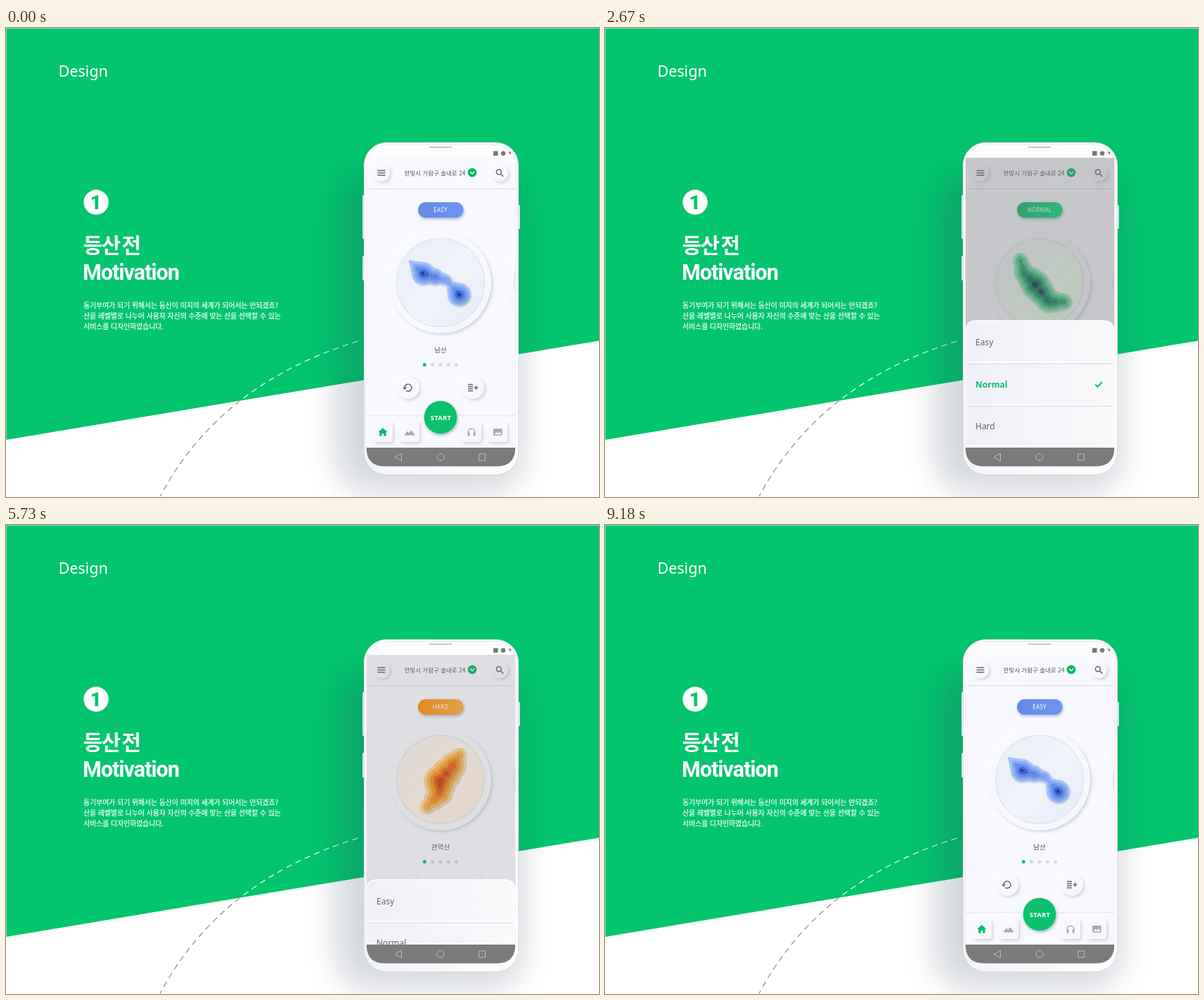
An HTML page for the animation above (9240 ms loop, 842 by 665 pixels).

```html
<!DOCTYPE html>
<html lang="ko">
<head>
<meta charset="utf-8">
<title>Design</title>
<style>
html, body { margin: 0; width: 100%; height: 100%; overflow: hidden; background: #fff; }
svg { display: block; width: 100%; height: 100%; }
text { font-family: "Noto Sans CJK KR", "Noto Sans CJK JP", sans-serif; }
.latin { font-family: "Noto Sans", sans-serif; }
.tight { font-family: Roboto, sans-serif; }
.mid { text-anchor: middle; }
.raised { fill: #f7f8fc; filter: drop-shadow(2px 2px 2px #cdd0dc) drop-shadow(-1px -1px 1px #fff); }
.line { fill: none; stroke: #666; stroke-width: 1.5; }
.layer { filter: drop-shadow(1px 1.5px 1.2px rgba(20, 30, 60, .25)); }
.pill { filter: drop-shadow(1px 2px 2px rgba(40, 60, 120, .35)); }
.row { font-size: 12px; fill: #666; }
.row.on { fill: #06c16b; font-weight: 600; }
.arc { fill: none; stroke-width: 1.2; stroke-dasharray: 8.5 6; }
</style>
</head>
<body>
<svg viewBox="0 0 842 665">
  <defs>
    <clipPath id="greenClip"><path d="M0 0H842V443.500L0 584Z"/></clipPath>
    <clipPath id="screenClip"><rect x="512" y="184" width="211" height="411"/></clipPath>
    <filter id="soft" x="-50%" y="-30%" width="200%" height="160%"><feGaussianBlur stdDeviation="25"/></filter>
    <linearGradient id="body" x2="1" y2="1">
      <stop stop-color="#fff"/><stop offset=".5" stop-color="#f3f4f8"/><stop offset="1" stop-color="#fff"/>
    </linearGradient>
    <linearGradient id="rowFill"><stop stop-color="#eff0f8"/><stop offset="1" stop-color="#f9f9fa"/></linearGradient>
  </defs>
  <defs id="fills"></defs>

  <path class="arc" d="M500 444Q304 504 219 664" stroke="#8a8a8a"/>
  <path d="M0 0H842V443.500L0 584Z" fill="#03c56e"/>
  <path d="M.5 584V.5H842" fill="none" stroke="#fff" opacity=".5"/>
  <path class="arc" d="M500 444Q304 504 219 664" stroke="#e6fff3" clip-path="url(#greenClip)"/>

  <g fill="#fff">
    <text class="latin" x="74.500" y="68.500" font-size="21.500" font-weight="500">Design</text>
    <circle cx="128" cy="247" r="17.700"/>
    <text class="mid tight" x="127.500" y="257" font-size="28" font-weight="900" fill="#03c56e">1</text>
    <text x="109.500" y="319" font-size="30" font-weight="900" letter-spacing="-1.6" word-spacing="-4">등산 전</text>
    <text class="tight" x="109" y="356.500" font-size="30.500" font-weight="700" letter-spacing="-1">Motivation</text>
    <g font-size="9.820" stroke="#fff" stroke-width=".2">
      <text x="110" y="396.500">동기부여가 되기 위해서는 등산이 미지의 세계가 되어서는 안되겠죠?</text>
      <text x="110" y="411.500">산을 레벨별로 나누어 사용자 자신의 수준에 맞는 산을 선택할 수 있는</text>
      <text x="110" y="426.500">서비스를 디자인하였습니다.</text>
    </g>
  </g>

  <!-- phone -->
  <rect x="470" y="205" width="262" height="450" rx="40" fill="#24364e" opacity=".2" filter="url(#soft)"/>
  <g fill="#f2f4f6" stroke="#d5dde0" stroke-width=".5">
    <rect x="506.500" y="237" width="4" height="62" rx="1.500"/>
    <rect x="506.500" y="323" width="4" height="35" rx="1.500"/>
    <rect x="725.500" y="251" width="4" height="34" rx="1.500"/>
  </g>
  <rect x="508.500" y="162.500" width="219" height="471" rx="32" fill="url(#body)" stroke="#d9dce4"/>
  <rect x="512" y="165.500" width="211" height="456" rx="28" fill="#fcfcfe" stroke="#e4e6ec" stroke-width=".6"/>
  <path d="M601 169H633" stroke="#aaa" stroke-width="1.300"/>
  <g fill="#777"><path d="M692 174.500h6.500v6.500h-6.500zM713 175l4 5v-4z"/><circle cx="706" cy="177.800" r="3.200"/></g>

  <g clip-path="url(#screenClip)">
    <rect x="512" y="184" width="211" height="411" fill="#f8f9fe"/>
    <path d="M512 228H723" stroke="#e6e8f0" stroke-width="2"/>
    <circle class="raised" cx="533" cy="205.500" r="12"/>
    <path class="line" d="M527.500 202.200h11M527.500 205.500h11M527.500 208.800h11"/>
    <circle class="raised" cx="701" cy="205.500" r="12"/>
    <path class="line" d="M702.600 207l3.600 3.600M703.300 204.300a3.500 3.500 0 1 1-7 0a3.500 3.500 0 1 1 7 0"/>
    <text class="mid" x="609" y="208.500" font-size="8.500" fill="#555">한빛시 가람구 솔내로 24</text>
    <circle cx="662" cy="205" r="6.300" fill="#05b966"/>
    <path d="M659 203.800l3 3l3-3" fill="none" stroke="#fff" stroke-width="1.400"/>

    <rect id="pill" class="pill" x="585" y="247" width="64.500" height="22" rx="11"/>
    <text id="pillText" class="mid latin" x="617" y="261" font-size="8" font-weight="500" letter-spacing=".2" fill="#fff"></text>
    <g id="cards"></g>
    <g id="dots"></g>

    <path d="M512 549.500H723" stroke="#e9ebf2" stroke-width="2"/>
    <circle class="raised" cx="571" cy="510" r="16"/>
    <path class="line" d="M566 510a5 5 0 1 1 2 4"/><path d="M562.800 509.500h6.400l-3.200 3.600z" fill="#666"/>
    <circle class="raised" cx="663" cy="510" r="16"/>
    <path class="line" d="M656 505.500h7M656 508.500h7M656 511.500h7M656 514.500h7M664.500 510h6M667.500 507v6"/>
    <g id="tabs"></g>
    <path d="M535 567l-6.500 6h1.800v5.500h3.400v-3.600h2.600v3.600h3.400v-5.500h1.800z" fill="#05bd68"/>
    <path d="M565.500 577.500l4.500-6l2.300 3l3-4.500l5.700 7.500z" fill="#a9abb2"/>
    <path d="M656.200 574.500v-1.500a4.800 4.800 0 0 1 9.600 0v1.500" fill="none" stroke="#a9abb2" stroke-width="1.500"/>
    <path d="M655.500 573.500h3v5h-3zM663.500 573.500h3v5h-3z" fill="#a9abb2"/>
    <rect x="692" y="568" width="12.500" height="10" rx="1.300" fill="#a9abb2"/>
    <path d="M693.500 576.500l3-3.800l2 2.200l2.300-3l2.800 4.600z" fill="#f7f8fc"/>
    <circle cx="617" cy="552" r="23.300" fill="#0cc16d" style="filter:drop-shadow(1px 2px 2px #9fb9b0)"/>
    <text class="mid latin" x="617.500" y="555.500" font-size="9.500" font-weight="700" letter-spacing=".2" fill="#fff">START</text>

    <rect id="dim" x="512" y="184" width="211" height="411" fill="#747474"/>
    <g id="sheet">
      <path d="M512 596V431q0-16 16-16H707q16 0 16 16V596z" fill="url(#rowFill)" stroke="#fff" stroke-width="1.500"/>
      <path d="M512 474H722M512 534H722M512 592H722" stroke="#fff" stroke-width="2"/>
      <path d="M513 476H721M513 536H721" stroke="#e0e1ee" stroke-width="1.600"/>
      <text class="row latin" x="526" y="450">Easy</text>
      <text class="row latin" x="526" y="509.500">Normal</text>
      <text class="row latin" x="526" y="568.500">Hard</text>
      <path id="tick" d="M696 505.500l3.300 3.300l6.500-6.800" fill="none" stroke="#06c16b" stroke-width="2"/>
    </g>
  </g>

  <path d="M512 595H723V599Q721 621 698 621.500H537Q514 621 512 599Z" fill="#7b7b7b"/>
  <g fill="none" stroke="#bdbdbd"><path d="M552 608.500l9.500-5.300v10.600zM671.500 604h9v9h-9z"/><circle cx="617" cy="608.500" r="5"/></g>
</svg>
<script>
const $ = id => document.getElementById(id);
const LOOP = 9240, STEP = 30, GAP = 167, GREEN = [5, 193, 107], GRAY = [214, 215, 222];

// A map is a mountain ridge: key points "x,y,radius" around the dish centre.
const levels = [
  { name: 'EASY', pill: ['#648be4', '#6c95ef'], dish: ['#e8edf7', '#eff4fb', '#e8ecfa'],
    shades: ['#a6c3fb', '#83a9f6', '#6690ee', '#3b67d2', '#12357f'],
    maps: { 남산: '-44,-31,1 -25,-13,15 8,-4,7 14,3,5 28,19,17',
            인왕산: '10,-53,5 2,-24,13 3,-5,14 -11,11,17 -18,46,8' } },
  { name: 'NORMAL', pill: ['#0bbd6b', '#06e27e'], dish: ['#eef4fa', '#edfbf0', '#e6ffe4'],
    shades: ['#8ce7b4', '#4fcf92', '#1fa56c', '#0d7a5c', '#053e42'],
    maps: { 청계산: '-28,-33,9 -22,-14,13 -6,3,19 13,27,15 37,27,10',
            도봉산: '-51,20,6 -31,20,7 -12,31,8 18,15,15 34,-8,9 47,-33,4' } },
  { name: 'HARD', pill: ['#ff8c0c', '#ffab40'], dish: ['#f8f0ec', '#fdf2e8', '#ffeadb'],
    shades: ['#ffd28a', '#fbb24a', '#f48f20', '#e4641a', '#d2400f'],
    maps: { 관악산: '27,-37,8 17,-20,17 -1,2,21 -2,20,16 -22,41,8',
            북한산: '-31,-27,7 4,-29,22 6,-4,16 12,16,11 24,46,6' } }
];

const disc = (x, y, r) => `M${x - r} ${y}a${r} ${r} 0 1 0 ${2 * r} 0a${r} ${r} 0 1 0 ${-2 * r} 0`;

// One contour: discs swept along the ridge, shrunk by inset, with a slightly uneven edge.
function contour(ridge, inset) {
  let d = '';
  for (let i = 0; i < (ridge.length - 1) * 8; i++) {
    const a = ridge[i >> 3], b = ridge[(i >> 3) + 1], k = i % 8 / 8;
    const [x, y, r] = a.map((v, j) => v + (b[j] - v) * k);
    const size = r * (1 + 0.09 * Math.sin(i * 1.7)) - inset;
    if (size > 0.5) d += disc(x, y, size);
  }
  return d;
}

function mapLayers(points, shades) {
  const ridge = points.split(' ').map(p => p.split(',').map(Number));
  const step = Math.max(...ridge.map(p => p[2])) / 4.7;
  return shades.map((fill, i) => `<path class="layer" fill="${fill}" d="${contour(ridge, i * step)}"/>`).join('');
}

function card(level, i, page) {
  const [name, points] = Object.entries(level.maps)[page] || [''];
  return `<g transform="translate(${617 + page * GAP} 361)">
    <circle class="raised" r="72"/>
    <circle r="62.5" fill="url(#dish${i})" stroke="#e3e5ee" stroke-width="1.5"/>
    ${points ? mapLayers(points, level.shades) : ''}
    <text class="mid" y="98.5" font-size="9.6" fill="#555">${name}</text></g>`;
}

const gradient = (id, colors, y2) => `<linearGradient id="${id}" x2="1" y2="${y2}">` +
  colors.map((c, i) => `<stop offset="${i / (colors.length - 1)}" stop-color="${c}"/>`).join('') + '</linearGradient>';

$('fills').innerHTML = levels.map((l, i) => gradient('pill' + i, l.pill, 0) + gradient('dish' + i, l.dish, 1)).join('');
$('cards').innerHTML = levels.map((l, i) => `<g>${[0, 1, 2].map(page => card(l, i, page)).join('')}</g>`).join('');
$('dots').innerHTML = [0, 1, 2, 3, 4].map(i => `<circle cx="${594.3 + i * 11.3}" cy="477.5" r="2.5"/>`).join('');
$('tabs').innerHTML = [535, 573, 661, 698].map(x =>
  `<rect class="raised" x="${x - 14}" y="559" width="28" height="28" rx="4"/>`).join('');

const decks = [...$('cards').children], dots = [...$('dots').children];
const rows = [...document.querySelectorAll('.row')];
const slideAt = [660, 3750, 6690], openAt = [1795, 4525, 7675], closeAt = [2820, 5600, 8750];

const clamp = u => Math.min(1, Math.max(0, u));
const smooth = u => (u = clamp(u), u * u * (3 - 2 * u));
const mix = k => `rgb(${GRAY.map((g, i) => g + (GREEN[i] - g) * k)})`;

function draw(t) {
  const level = t < 2670 || t >= 8550 ? 0 : t < 5400 ? 1 : 2;
  const u = t >= 8550 ? 0 : clamp((t - slideAt[level]) / 500);
  const shift = 1 - (1 - u) ** 3, fade = smooth(u * 1.35);
  const up = openAt.reduce((s, o, i) => s + smooth((t - o) / 275) - smooth((t - closeAt[i]) / 265), 0);

  decks.forEach((g, i) => {
    g.style.display = i === level ? '' : 'none';
    g.setAttribute('transform', `translate(${-GAP * shift})`);
  });
  dots.forEach((c, i) => c.setAttribute('fill', mix(i === 0 ? 1 - fade : i === 1 ? fade : 0)));
  $('pill').setAttribute('fill', `url(#pill${level})`);
  $('pillText').textContent = levels[level].name;
  rows.forEach((r, i) => r.classList.toggle('on', i === level));
  $('tick').setAttribute('transform', `translate(0 ${(level - 1) * 59.5})`);
  $('dim').setAttribute('opacity', 0.38 * up);
  $('sheet').setAttribute('transform', `translate(0 ${181 * (1 - up)})`);
}

const start = performance.now();
function tick() {
  const t = (performance.now() - start) % LOOP;
  draw(Math.floor(t / STEP) * STEP);
  requestAnimationFrame(tick);
}
tick();
</script>
</body>
</html>
```
